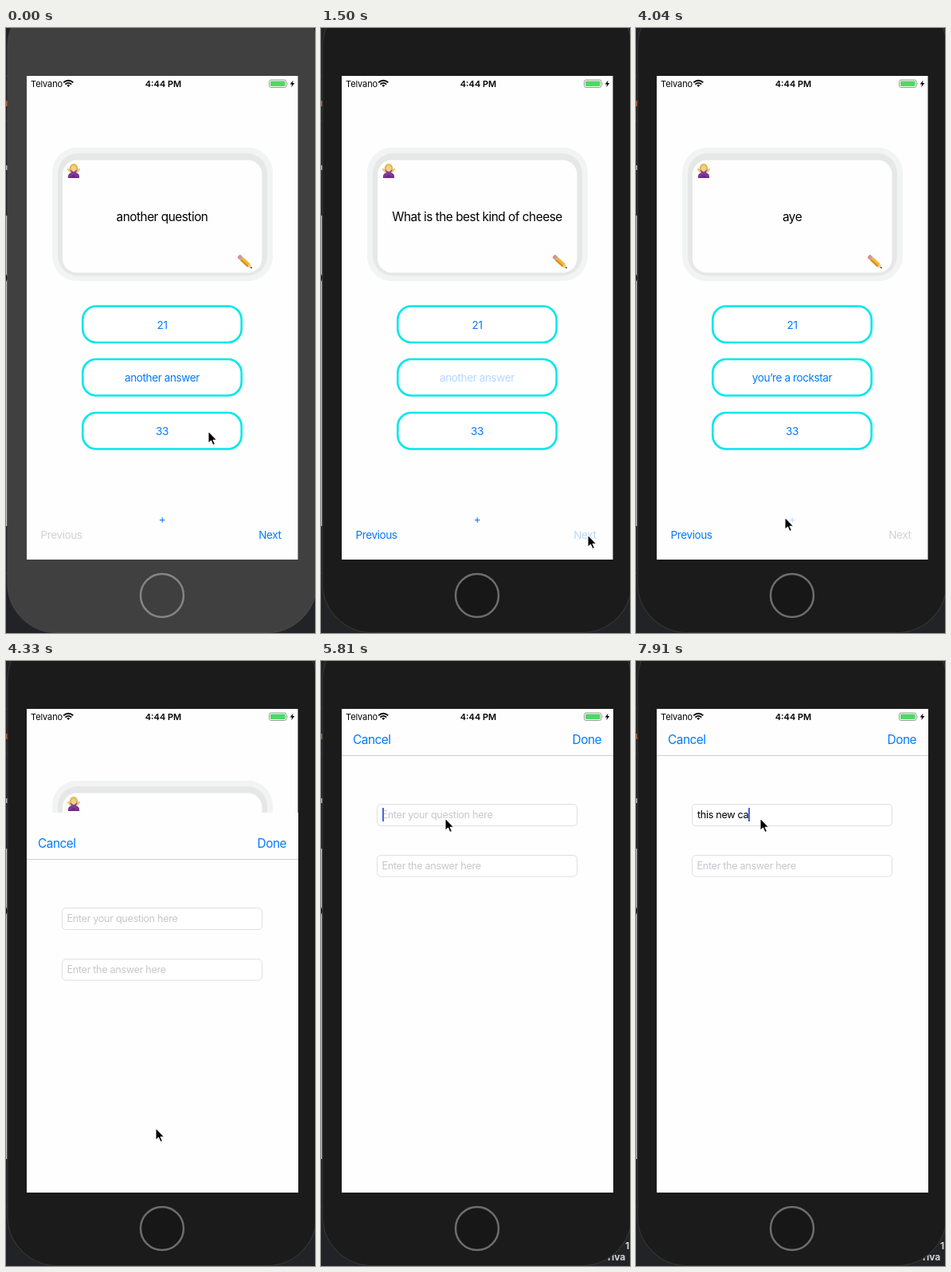
An HTML page for the animation above (8000 ms loop, 388 px wide and 758 px high).

```html
<!DOCTYPE html>
<html lang="en">
<head>
<meta charset="utf-8">
<title>Quiz cards</title>
<style>
html, body { margin: 0; width: 100%; height: 100%; overflow: hidden; background: #222326; }
body { position: relative; }
svg { display: block; position: absolute; left: 0; top: 0; }
text, .typed { font-family: Inter, "Open Sans", sans-serif; }

.body-text { font-size: 15.4px; letter-spacing: -.5px; }
.button { font-size: 13.6px; letter-spacing: -.43px; fill: #007aff; }
.mid { text-anchor: middle; }
.end { text-anchor: end; }
.blue { fill: #007aff; }
.hint { font-size: 12.7px; letter-spacing: -.35px; fill: #c7c7cc; }
.status { font-size: 11px; }
.outline rect { fill: #fff; stroke: #00e7ea; stroke-width: 2.6; }
.field { fill: #fff; stroke: #e0e0e1; }
.code { font: bold 12px "DejaVu Sans Mono", monospace; fill: #d4d4d6; }

/* Everything advances in hard steps on one 8 s clock. */
.anim, .typed::before, .typed::after { animation: 8s step-end infinite; }
.case { animation-name: case; }
.home { animation-name: home; }
.q1 { animation-name: q1; }
.q2 { animation-name: q2; }
.q3 { animation-name: q3; }
.a1 { animation-name: a1; }
.a2 { animation-name: a2; }
.a3 { animation-name: a3; }
.prev { animation-name: prev; }
.next { animation-name: next; }
.plus { animation-name: plus; }
.sheet { animation-name: sheet; }
.first-hint { animation-name: first-hint; }
.code { opacity: 0; animation-name: code; }
.cursor { animation-name: cursor; }

.typed {
  position: absolute; left: 77px; top: 184px; height: 17px;
  display: flex; white-space: pre;
  font-size: 12.7px; line-height: 17px; letter-spacing: -.35px; color: #000;
}
.typed::before { content: ""; animation-name: type; }
.typed::after { content: ""; width: 1.8px; background: #4169e0; animation-name: caret; }

@keyframes case { 0% { fill: #404040; stroke: #484848; } 18.75%, 100% { fill: #1b1b1b; stroke: #343434; } }
@keyframes home { 0% { fill: #3f3f3f; stroke: #858585; } 18.75%, 100% { fill: #171717; stroke: #6d6d6d; } }

@keyframes q1 { 0% { opacity: 1; } 18.75%, 100% { opacity: 0; } }
@keyframes q2 { 0% { opacity: 0; } 18.75% { opacity: 1; } 31.75%, 100% { opacity: 0; } }
@keyframes q3 { 0% { opacity: 0; } 31.75%, 100% { opacity: 1; } }

@keyframes a1 { 0% { opacity: 1; } 18.75% { opacity: .3; } 20.5%, 100% { opacity: 0; } }
@keyframes a2 {
  0% { opacity: 0; } 20.5% { opacity: .6; } 22.375% { opacity: 1; }
  31.75% { opacity: .3; } 33.625%, 100% { opacity: 0; }
}
@keyframes a3 { 0% { opacity: 0; } 33.625% { opacity: .6; } 35.5%, 100% { opacity: 1; } }

@keyframes prev { 0% { fill: #d2d2d2; } 18.75%, 100% { fill: #007aff; } }
@keyframes next {
  0% { fill: #007aff; } 18.75% { fill: #b9d9fb; } 20.5% { fill: #66afff; } 22.375% { fill: #007aff; }
  31.75% { fill: #b9d9fb; } 33.625%, 100% { fill: #d2d2d2; }
}
@keyframes plus { 0% { opacity: 1; } 50.5%, 100% { opacity: .25; } }

@keyframes sheet {
  0% { transform: translateY(606px); }
  52.25% { transform: translateY(480px); }
  54.125% { transform: translateY(130px); }
  56% { transform: translateY(16px); }
  57.75%, 100% { transform: none; }
}
@keyframes first-hint { 0% { opacity: 1; } 80.125%, 100% { opacity: 0; } }
@keyframes code { 0% { opacity: 0; } 70.75%, 100% { opacity: 1; } }
@keyframes caret { 0% { opacity: 0; } 69% { opacity: 1; } 78.25% { opacity: 0; } 80.125%, 100% { opacity: 1; } }
@keyframes type {
  0% { content: ""; }
  80.125% { content: "t"; }
  85.75% { content: "this"; }
  89.5% { content: "this "; }
  91.375% { content: "this n"; }
  93.25% { content: "this ne"; }
  95.125% { content: "this new"; }
  97% { content: "this new c"; }
  98.875%, 100% { content: "this new ca"; }
}
@keyframes cursor {
  0% { transform: translate(254px, 505px); }
  3.75% { transform: translate(258px, 514px); }
  5.625% { transform: translate(286px, 562px); }
  7.5% { transform: translate(325px, 612px); }
  9.375% { transform: translate(344px, 632px); }
  11.25% { transform: translate(347px, 635px); }
  13.125% { transform: translate(340px, 635px); }
  15% { transform: translate(335px, 635px); }
  41.125% { transform: translate(324px, 640px); }
  43% { transform: translate(270px, 635px); }
  44.875% { transform: translate(204px, 620px); }
  46.75% { transform: translate(187px, 613px); }
  54.125% { transform: translate(188px, 585px); }
  56% { transform: translate(190px, 380px); }
  57.75% { transform: translate(186.5px, 243px); }
  59.625% { transform: translate(167px, 220px); }
  63.375% { transform: translate(159px, 203px); }
  65.25%, 100% { transform: translate(156px, 197px); }
}
</style>
</head>
<body>
<svg width="388" height="758" viewBox="0 0 388 758">
  <defs>
    <clipPath id="screen"><rect x="26" y="60" width="340.5" height="606"/></clipPath>
  </defs>

  <!-- Desktop behind the phone -->
  <rect width="388" height="758" fill="#222326"/>
  <path d="M0 116H3M0 60H3M0 683H3" stroke="#3a3b3e"/>
  <path d="M0 235V624" stroke="#c4c4c4" stroke-width="3"/>
  <path d="M0 91H3V98H0Z" fill="#b5633c"/>
  <path d="M0 172H3V178H0Z" fill="#b8b8b8"/>
  <path d="M0 308L2 313 0 318Z" fill="#111"/>
  <g class="anim code"><text x="382" y="737">1</text><text x="360" y="751">riva</text></g>

  <!-- Phone -->
  <rect class="anim case" x="2" y="-38" width="388" height="795.5" rx="62" stroke-width="1.2"/>
  <circle class="anim home" cx="196" cy="711" r="27" stroke-width="2.5"/>
  <rect x="26" y="60" width="340.5" height="606" fill="#fefefe"/>

  <g clip-path="url(#screen)">
    <!-- Question card -->
    <rect x="58" y="150" width="277" height="167" rx="31" fill="#f2f3f3"/>
    <rect x="65" y="157" width="263" height="153.500" rx="25" fill="#e6e7e7"/>
    <rect x="71" y="165.500" width="250.500" height="141" rx="18" fill="#fefefe"/>
    <g class="body-text mid">
      <text class="anim q1" x="196" y="242">another question</text>
      <text class="anim q2" x="196" y="242">What is the best kind of cheese</text>
      <text class="anim q3" x="196" y="242">aye</text>
    </g>

    <!-- Woman with crossed arms -->
    <g transform="translate(85 179)">
      <path d="M-5 2C-6-5-4-9 0-9S6-5 5 2Z" fill="#d9b04a"/>
      <ellipse cy="-2.500" rx="3.300" ry="4.300" fill="#f3cf8c"/>
      <path d="M-3.500-3C-3-7 0-7 1-7L4-3 3-7 0-9-3-7Z" fill="#e5c05c"/>
      <path d="M-7 9C-7.500 4-5 2 0 2S7.500 4 7 9Z" fill="#6d2c84"/>
      <path d="M-6 7L5-0.500M6 7L-5-0.500" stroke="#83399a" stroke-width="2.600"/>
      <path d="M-7-2L-4.500 1M7-2L4.500 1" stroke="#f0c57c" stroke-width="2.400" stroke-linecap="round"/>
    </g>

    <!-- Pencil -->
    <g transform="translate(292 285.500) rotate(43)">
      <rect y="-2.700" width="4" height="5.400" rx="1.500" fill="#e58a86"/>
      <rect x="3" y="-2.700" width="2.500" height="5.400" fill="#a9adb2"/>
      <rect x="5.500" y="-2.700" width="12" height="5.400" fill="#f5b52e"/>
      <path d="M5.500 1.700H17.500" stroke="#d98a1d" stroke-width="2"/>
      <path d="M17.500-2.700L23 0 17.500 2.700Z" fill="#eccb9c"/>
      <path d="M21-1L23.500 0 21 1Z" fill="#333"/>
    </g>

    <!-- Answers -->
    <g class="outline">
      <rect x="96.300" y="348.500" width="199.400" height="45.500" rx="17"/>
      <rect x="96.300" y="415" width="199.400" height="45.500" rx="17"/>
      <rect x="96.300" y="482" width="199.400" height="45.500" rx="17"/>
    </g>
    <g class="button mid">
      <text x="196" y="376.500">21</text>
      <text class="anim a1" x="196" y="443">another answer</text>
      <text class="anim a2" x="196" y="443">cheddar</text>
      <text class="anim a3" x="196" y="443">you’re a rockstar</text>
      <text x="196" y="510">33</text>
      <text class="anim plus" x="196" y="620">+</text>
    </g>
    <text class="button anim prev" x="43.500" y="639.500">Previous</text>
    <text class="button end anim next" x="345.500" y="639.500">Next</text>

    <!-- New card form -->
    <g class="anim sheet">
      <rect x="26" y="60" width="341" height="606" fill="#fefefe"/>
      <path d="M26 118.500H367" stroke="#cfcfcf"/>
      <text class="body-text blue" x="40" y="104">Cancel</text>
      <text class="body-text blue end" x="352" y="104">Done</text>
      <rect class="field" x="70.500" y="179.500" width="251" height="27" rx="4.500"/>
      <rect class="field" x="70.500" y="243.500" width="251" height="26.500" rx="4.500"/>
      <text class="hint anim first-hint" x="76.500" y="197">Enter your question here</text>
      <text class="hint" x="76.500" y="261">Enter the answer here</text>
    </g>
  </g>

  <!-- Status bar -->
  <g class="status">
    <text x="31" y="74" letter-spacing="-.1">Telvano</text>
    <text class="mid" x="197.500" y="74" font-weight="600">4:44 PM</text>
  </g>
  <g fill="none" stroke="#000" stroke-width="1.800">
    <path d="M72.300 68.300Q78.300 63.300 84.300 68.300M74.400 70.600Q78.300 67.200 82.200 70.600"/>
    <path d="M76.300 71.800Q78.300 70.200 80.300 71.800L78.300 74Z" fill="#000" stroke="none"/>
  </g>
  <rect x="330.500" y="65" width="21.500" height="9.500" rx="2.300" fill="#fff" stroke="#8e8e8e" stroke-width=".9"/>
  <rect x="332" y="66.500" width="18.500" height="6.500" rx="1" fill="#4cd964"/>
  <path d="M353.300 68.200Q355 69.700 353.300 71.300Z" fill="#8e8e8e"/>
  <path d="M360.500 65.500L356.700 70.500H359.200L358.200 74.200 362.300 69H359.700Z"/>

  <path class="anim cursor" d="M0 0V15.500L3.600 12.200 6 17.600 8.600 16.500 6.200 11.300H11Z"
        stroke="#fff" stroke-width="1.100" stroke-linejoin="round"/>
</svg>
<div class="typed"></div>
</body>
</html>
```
